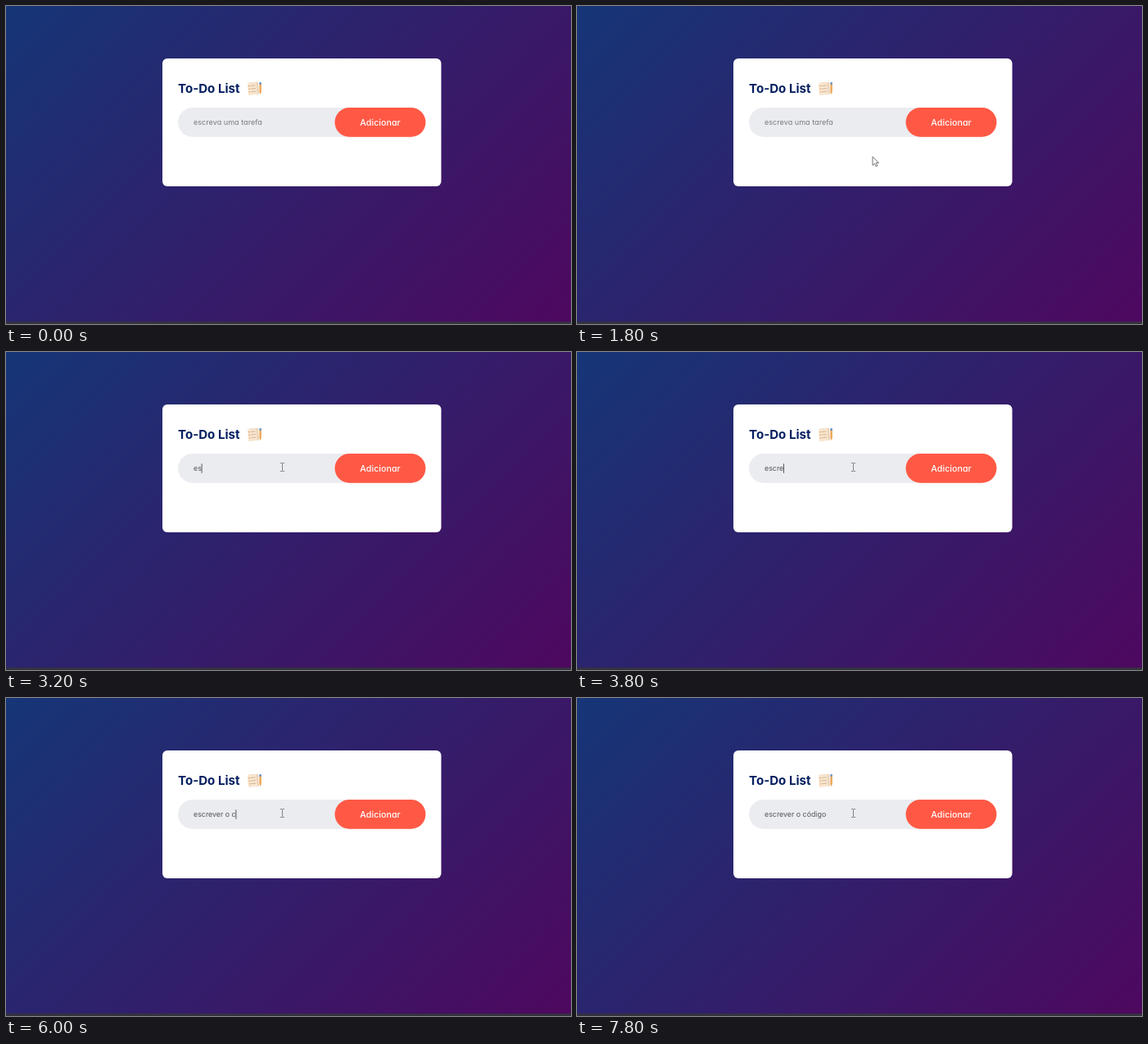
An HTML page that plays this animation: 690 by 388 pixels, repeating every 8 s.

```html
<!DOCTYPE html>
<html lang="pt">
<head>
<meta charset="utf-8">
<title>To-Do List</title>
<style>
  html, body { margin: 0; width: 100%; height: 100%; overflow: hidden; }
  body { background: linear-gradient(135deg, #153677, #4e085f); }
  svg { display: block; width: 690px; height: 388px; }
  text { font-family: Inter, "Open Sans", sans-serif; font-feature-settings: "cv11"; white-space: pre; }
</style>
</head>
<body>
<svg viewBox="0 0 690 388">
  <rect y="385" width="690" height="3" fill="#34323f"/>
  <rect x="191" y="64" width="340.5" height="156" rx="6" fill="#fff"/>
  <text x="210" y="105.5" font-size="15.1" font-weight="650" fill="#051f60">To-Do List</text>

  <g id="notes" stroke-linecap="round">
    <path d="M297 93.5 308 92.8 309 107.5 298 108.6Z" fill="#ead2b6"/>
    <path d="M294.8 94.2 305.5 93.2 307 107.8 296 109Z" fill="#f8e6cf"/>
    <path d="M298.8 97.4 304.2 96.9M299.2 101 304.6 100.5M299.6 104.6 305 104.1" stroke="#c8a98a" stroke-width=".8"/>
    <path d="M296.6 97.6h.3M297 101.2h.3M297.4 104.8h.3" stroke="#e58a55" stroke-width="1.2"/>
    <path d="M309.4 95.5h2.4v9.5l-1.2 3-1.2-3z" fill="#eda34f"/>
    <path d="M309.4 93.2h2.4v2.6h-2.4z" fill="#5b86b8"/>
  </g>

  <rect x="210" y="124" width="302" height="35.7" rx="17.85" fill="#ebecf0"/>
  <rect x="401.5" y="124" width="111" height="35.7" rx="17.85" fill="#ff5945"/>
  <text x="457" y="145.5" font-size="10.7" font-weight="500" fill="#fff" text-anchor="middle">Adicionar</text>

  <text id="hint" x="229" y="144.8" font-size="9.1" fill="#7b7b80">escreva uma tarefa</text>
  <text id="entry" x="229" y="144.8" font-size="8.85" fill="#555559"></text>
  <rect id="caret" y="136.3" width=".9" height="11.4" fill="#444"/>

  <path id="arrow" d="M0 0V10.6L2.5 8.4 4.1 12 5.9 11.2 4.3 7.7H7.4Z" fill="#fff" stroke="#555" stroke-width=".8"/>
  <path id="beam" d="M-2.5-5H-.6L0-4.5.6-5H2.5M0-4.5V4.5M-2.5 5H-.6L0 4.5.6 5H2.5" fill="none" stroke="#77777c" stroke-width=".9"/>
</svg>
<script>
  const LOOP = 8000, STEP = 100;
  const phrase = "escrever o código";
  const keyTimes = [3000, 3200, 3400, 3700, 3800, 4500, 4600, 4800, 5000,
                    5400, 5700, 5900, 6400, 6800, 6900, 7100, 7200];
  const caretSpans = [[2200, 2700], [3000, 4300], [4500, 7800]];
  const [hint, entry, caret, arrow, beam] =
    ["hint", "entry", "caret", "arrow", "beam"].map(id => document.getElementById(id));

  const show = (el, on) => el.setAttribute("visibility", on ? "visible" : "hidden");

  function drawPointer(t) {
    const u = Math.min(Math.max((t - 1500) / 600, 0), 1);
    const left = (1 - u) ** 2;
    const x = 337.5 + 94 * left, y = 140.5 + 173 * left;
    const overInput = y < 160;
    show(arrow, t >= 1500 && !overInput);
    show(beam, overInput);
    for (const el of [arrow, beam]) el.setAttribute("transform", `translate(${x} ${y})`);
  }

  function drawEntry(t) {
    const count = keyTimes.filter(k => k <= t).length;
    const typed = phrase.slice(0, count);
    if (entry.textContent !== typed) entry.textContent = typed;
    show(hint, !count);
    show(caret, caretSpans.some(([a, b]) => t >= a && t < b));
    caret.setAttribute("x", 228.8 + (count ? entry.getComputedTextLength() : 0));
  }

  function frame() {
    const t = Math.floor(performance.now() % LOOP / STEP) * STEP;
    drawPointer(t);
    drawEntry(t);
    requestAnimationFrame(frame);
  }
  frame();
</script>
</body>
</html>
```
